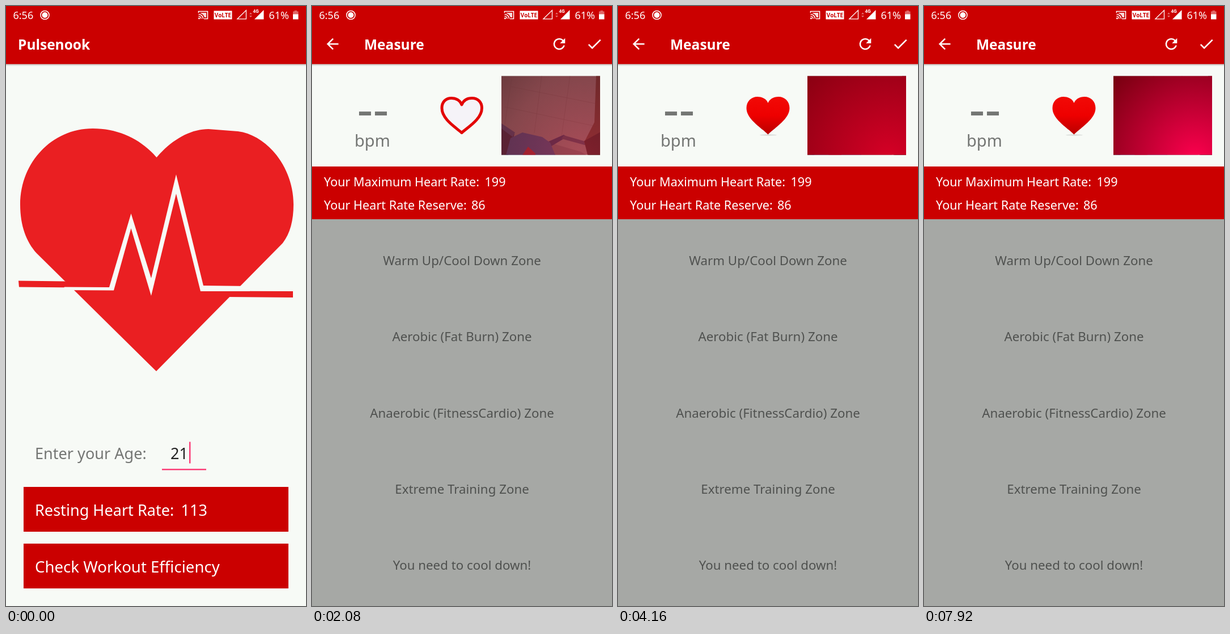
An HTML page for the animation above (8 s loop, 529 px wide and 1058 px high).

```html
<!DOCTYPE html>
<html lang="en">
<head>
<meta charset="utf-8">
<title>Pulse monitor</title>
<style>
  html, body { margin: 0; width: 100%; height: 100%; overflow: hidden; background: #f7faf6; }
  svg { display: block; width: 529px; height: 1058px; }
  text { font-family: "Noto Sans", "Open Sans", sans-serif; fill: #fff; }
  .title { font-size: 24.5px; font-weight: 700; }
  .big { font-size: 27.1px; }
  .mid { font-size: 21.6px; }
  .zone { font-size: 22.3px; fill: #4f514f; text-anchor: middle; }
  .status { font-size: 18px; }
  .grey { fill: #747674; }
</style>
</head>
<body>
<svg viewBox="0 0 529 1058">
  <defs>
    <radialGradient id="glow" gradientUnits="userSpaceOnUse" cx="478" cy="268" r="200">
      <stop id="bright" offset="0"/>
      <stop id="dark" offset="1"/>
    </radialGradient>
    <linearGradient id="gloss" x2="0" y2="1">
      <stop offset="0" stop-color="#f20a06"/>
      <stop offset=".5" stop-color="#ee0000"/>
      <stop offset="1" stop-color="#b80000"/>
    </linearGradient>
    <linearGradient id="wall" x2="1" y2=".7">
      <stop offset="0" stop-color="#8b9089"/>
      <stop offset=".35" stop-color="#a5a9a1"/>
      <stop offset="1" stop-color="#a9aca6"/>
    </linearGradient>
    <linearGradient id="shade" x2="0" y2="1">
      <stop offset="0" stop-color="#000" stop-opacity=".2"/>
      <stop offset="1" stop-color="#000" stop-opacity="0"/>
    </linearGradient>
    <clipPath id="view"><rect x="334" y="123.500" width="174" height="139"/></clipPath>
  </defs>

  <g id="home">
    <rect width="529" height="1058" fill="#f7faf6"/>
    <rect width="529" height="102.500" fill="#cb0000"/>
    <rect y="102.500" width="529" height="4" fill="url(#shade)"/>
    <text class="title" x="21" y="76.500">Pulsenook</text>

    <g fill="#ea1f22">
      <path d="M265 644L54 436C36 416 25 388 25 350C25 275 82 216 153 216C200 216 239 236 265.500 267C292 236 325 217 357 217L409 221C462 228 507 286 507 350C507 378 501 401 488 418Z"/>
      <path d="M22 484.500L104 485.500L125 496.500L23 495.500Z"/>
      <path d="M340 502.500L506 503V514L390 513Z"/>
    </g>
    <path fill="#f7faf6" d="M103 495.500L182 496L220.500 366L256 480L300 297L348 493L430 494V503L343 503L300 331L256 511L220.500 392L190 501.500L100 501Z"/>

    <text class="big grey" x="51" y="799">Enter your Age:</text>
    <text class="big" x="290" y="799" style="fill:#222">21</text>
    <rect x="275" y="816" width="78" height="2.500" fill="#fb3f78"/>
    <rect id="caret" x="323" y="768.500" width="2.500" height="38" fill="#fb3f78"/>

    <path fill="#cb0000" d="M31 848H498V927H31ZM31 948H498V1027H31Z"/>
    <text class="big" x="51" y="899">Resting Heart Rate:</text>
    <text class="big" x="308.500" y="899">113</text>
    <text x="51" y="999" font-size="27.6">Check Workout Efficiency</text>
  </g>

  <g id="measure">
    <rect width="529" height="1058" fill="#f7faf6"/>
    <rect width="529" height="102.500" fill="#cb0000"/>
    <rect y="102.500" width="529" height="4" fill="url(#shade)"/>
    <text class="title" x="92" y="76.500">Measure</text>
    <g fill="#fff">
      <path transform="translate(20.800 51.500) scale(1.29)" d="M20 11H7.830l5.590-5.590L12 4l-8 8 8 8 1.410-1.410L7.830 13H20z"/>
      <path transform="translate(420.500 51.500) scale(1.29)" d="M17.650 6.350A7.950 7.950 0 0 0 12 4a8 8 0 1 0 7.730 10h-2.080A6 6 0 1 1 12 6c1.660 0 3.140.690 4.220 1.780L13 11h7V4z"/>
      <path transform="translate(482.500 51.500) scale(1.29)" d="M9 16.170L4.830 12l-1.420 1.410L9 19 21 7l-1.410-1.410z"/>
    </g>

    <text class="grey" x="79.400" y="212.500" font-size="87">--</text>
    <text class="grey" x="75" y="248" font-size="29">bpm</text>

    <g id="full">
      <ellipse cx="265" cy="227.500" rx="15" ry="1.200" fill="#d8dad8"/>
      <path fill="url(#gloss)" d="M264.500 226.500C251 213.500 226.500 199 226.500 180C226.500 168 235 160 246 160C255 160 262 164.500 264.500 171C267 164.500 274 160 283 160C294 160 302.500 168 302.500 180C302.500 199 278 213.500 264.500 226.500Z"/>
    </g>
    <path id="hollow" fill="#f5f3f8" stroke="#e30404" stroke-width="5" stroke-linejoin="round" d="M264 223.500C252 213 229 199 229 180C229 169 236 162.500 246 162.500C255 162.500 261 167 264 174C267 167 273 162.500 282 162.500C292 162.500 299.500 169 299.500 180C299.500 199 276 213 264 223.500Z"/>

    <g clip-path="url(#view)">
      <rect x="334" y="123" width="175" height="140" fill="url(#wall)"/>
      <path d="M350 142L500 172M340 178L500 212M352 128L340 208M405 123L392 224M455 123L440 230" fill="none" stroke="#858a83" opacity=".6"/>
      <path d="M334 209L357 226L346 263H334Z" fill="#30465f"/>
      <path d="M334 207L358 223L354 231L334 216Z" fill="#4a7099"/>
      <path d="M405 237L474 257L484 263H428Z" fill="#8b9190"/>
      <path d="M408 243L444 227L449 231L414 252Z" fill="#2c5280"/>
      <path d="M444 228L486 240L484 246L440 234Z" fill="#4c6580"/>
      <path d="M501 123H509V263H488L480 240L498 205Z" fill="#6e5a48"/>
      <path d="M480 238L509 222V263H486Z" fill="#3a3733"/>
      <path d="M342 263L350 233L371 223L406 231L420 241L429 263Z" fill="#3f74b0"/>
      <path d="M371 263L381 248L394 260V263Z" fill="#d7414a"/>
      <rect id="finger" x="334" y="123" width="175" height="140" fill="url(#glow)"/>
    </g>

    <rect y="283" width="529" height="93" fill="#cb0000"/>
    <text class="mid" x="21" y="318">Your Maximum Heart Rate:</text>
    <text class="mid" x="304.500" y="318">199</text>
    <text class="mid" x="21" y="359">Your Heart Rate Reserve:</text>
    <text class="mid" x="281" y="359">86</text>
    <rect y="376" width="529" height="690" fill="#a6a8a5"/>
    <g id="zones"></g>
  </g>

  <rect id="tint" width="529" height="22" fill="#b70000"/>
  <g fill="#fff">
    <text class="status" x="12.500" y="22.500">6:56</text>
    <circle cx="68.500" cy="16" r="7.600" fill="none" stroke="#fff" stroke-width="1.500"/>
    <circle cx="68.500" cy="16" r="5"/>
    <path d="M339.500 12V9.500H355.500V22.500H349M339.500 14.500a8 8 0 0 1 8 8M339.500 18a4.500 4.500 0 0 1 4.500 4.500" fill="none" stroke="#fff" stroke-width="1.600"/>
    <path d="M343 12H353V20H350Q348 14 343 13Z" opacity=".85"/>
    <circle cx="340.500" cy="21.800" r="1.500"/>
    <rect x="366.500" y="8.500" width="32" height="15"/>
    <text x="382.500" y="20" font-size="10" font-weight="700" text-anchor="middle" style="fill:#cb0000">VoLTE</text>
    <path d="M408 22.800L423.500 7.500V22.800Z" fill="none" stroke="#fff" stroke-width="1.300"/>
    <path d="M429 14.500L431.500 11.500L434 14.500ZM429 17L431.500 20L434 17Z" opacity=".45"/>
    <path d="M438 23.500L454.500 7V23.500Z"/>
    <text x="435.500" y="12" font-size="8" font-weight="700">4G</text>
    <text class="status" x="463.500" y="22.500">61%</text>
    <path d="M506 15V9.500H508.500V8H513V9.500H515.500V15Z" opacity=".4"/>
    <rect x="506" y="14.500" width="9.500" height="9"/>
  </g>
</svg>
<script>
  const LOOP = 8000, STEP = 80;
  const $ = id => document.getElementById(id);

  const zones = ["Warm Up/Cool Down Zone", "Aerobic (Fat Burn) Zone", "Anaerobic (FitnessCardio) Zone",
    "Extreme Training Zone", "You need to cool down!"];
  $("zones").innerHTML = zones.map((name, i) =>
    `<text class="zone" x="264.500" y="${457 + i * 134.300}">${name}</text>`).join("");

  // time, dark corner, bright corner of the covered camera view
  const light = [
    [1900, [70, 10, 18], [150, 25, 40]],
    [2640, [158, 0, 20], [232, 0, 44]],
    [4160, [140, 0, 18], [214, 0, 38]],
    [6560, [138, 0, 16], [250, 0, 62]],
    [7920, [120, 0, 16], [252, 0, 78]]
  ];

  const clamp = v => Math.max(0, Math.min(1, v));
  const ramp = (t, from, to) => clamp((t - from) / (to - from));
  const show = (id, on) => $(id).setAttribute("visibility", on ? "visible" : "hidden");
  const blend = (a, b, k) => `rgb(${a.map((v, i) => Math.round(v + (b[i] - v) * k))})`;

  function setLight(t) {
    let i = 0;
    while (i < light.length - 2 && t > light[i + 1][0]) i++;
    const [a, b] = [light[i], light[i + 1]], k = ramp(t, a[0], b[0]);
    $("dark").setAttribute("stop-color", blend(a[1], b[1], k));
    $("bright").setAttribute("stop-color", blend(a[2], b[2], k));
  }

  function render(t) {
    const open = ramp(t, 1500, 1840);
    const shift = 76.500 * (1 - open) ** 3;
    const opened = t >= 1500;
    show("caret", (t + 280) % 1000 < 500);
    show("measure", opened);
    $("measure").setAttribute("transform", `translate(0 ${shift.toFixed(2)})`);
    $("measure").setAttribute("opacity", ramp(t, 1500, 1650));
    show("tint", opened && shift > 1);

    const beat = t >= 2376 && (t - 2376) % 880 < 440;
    if (opened) {
      $("full").style.display = beat ? "" : "none";
      $("hollow").style.display = beat ? "none" : "";
    }
    $("finger").setAttribute("opacity", ramp(t, 1880, 2200));
    setLight(t);
  }

  function tick() {
    render(Math.floor(performance.now() % LOOP / STEP) * STEP);
    requestAnimationFrame(tick);
  }
  tick();
</script>
</body>
</html>
```
